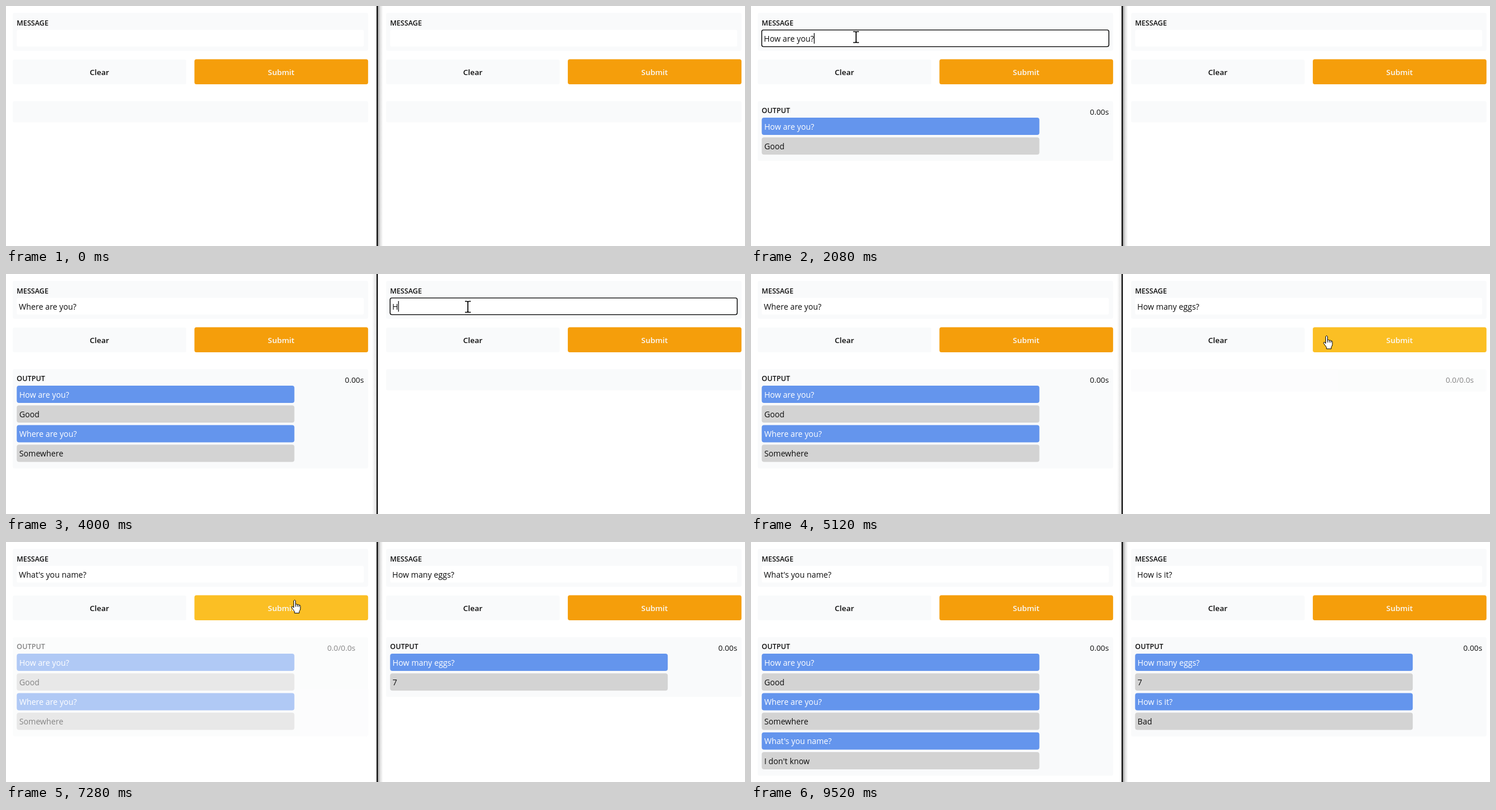
An HTML page for the animation above (9600 ms loop, 1280x417 px).

```html
<!DOCTYPE html>
<html lang="en">
<head>
<meta charset="utf-8">
<title>Two chat sessions</title>
<style>
  html, body { margin: 0; width: 100%; height: 100%; overflow: hidden; background: #fff; }
  svg { display: block; width: 100%; height: 100%; }
  text { font: 13.8px "Open Sans", "Noto Sans", sans-serif; fill: #0c0c0c; white-space: pre; }
  .label { font-size: 12.2px; font-weight: 600; }
  .button { font-size: 13.4px; font-weight: 600; text-anchor: middle; }
  .time { font-size: 13.3px; text-anchor: end; }
</style>
</head>
<body>
<svg id="stage" viewBox="0 0 1280 417">
  <defs>
    <linearGradient id="shadowRight">
      <stop offset="0" stop-color="#000" stop-opacity=".42"/>
      <stop offset=".4" stop-color="#000" stop-opacity=".14"/>
      <stop offset="1" stop-color="#000" stop-opacity="0"/>
    </linearGradient>
    <linearGradient id="shadowLeft">
      <stop offset="0" stop-color="#000" stop-opacity="0"/>
      <stop offset="1" stop-color="#000" stop-opacity=".13"/>
    </linearGradient>
  </defs>
</svg>
<script>
const LOOP = 9600, STEP = 80, FADE = 150;
const PANEL = '#f9fafb', AMBER = [245, 158, 11], AMBER_HOVER = [251, 191, 36];
const RIGHT = 646.7;
const stage = document.getElementById('stage');

function add(parent, tag, attrs = {}, text = '') {
  const node = document.createElementNS('http://www.w3.org/2000/svg', tag);
  set(node, attrs);
  node.textContent = text;
  return parent.appendChild(node);
}
function set(node, attrs) {
  for (const key in attrs) node.setAttribute(key, attrs[key]);
}
const box = (parent, x, y, width, height, rx, fill) =>
  add(parent, 'rect', { x, y, width, height, rx, fill });
const show = (node, on) => set(node, { visibility: on ? 'visible' : 'hidden' });
const within = (spans, t) => spans.some(([from, to]) => t >= from && t < to);
const latest = (keys, t) => keys.reduce((value, [at, next]) => t >= at ? next : value, '');

const sessions = [
  {
    x: 0,
    typed: [
      [640, 'H'], [800, 'Ho'], [880, 'How '], [960, 'How ar'], [1040, 'How are y'],
      [1120, 'How are you'], [1280, 'How are you?'],
      [2480, 'W'], [2560, 'Whe'], [2640, 'Where'], [2720, 'Where a'], [2800, 'Where are '],
      [2880, 'Where are yo'], [2960, 'Where are you?'],
      [6080, 'W'], [6160, 'Wha'], [6240, "What'"], [6320, "What's "], [6400, "What's yo"],
      [6480, "What's you "], [6560, "What's you na"], [6640, "What's you name"],
      [6800, "What's you name?"]
    ],
    focus: [[320, 1680], [2080, 3200], [5440, 7120]],
    selected: [[2320, 2480], [5920, 6080]],
    caretOff: [[560, 640], [5600, 5760]],
    loading: [[1680, 1840], [3280, 3440], [7200, 7360]],
    replies: [
      [1840, 'How are you?', 'Good'],
      [3440, 'Where are you?', 'Somewhere'],
      [7360, "What's you name?", "I don't know"]
    ]
  },
  {
    x: RIGHT,
    typed: [
      [4000, 'H'], [4160, 'Ho'], [4240, 'How '], [4320, 'How m'], [4400, 'How man'],
      [4480, 'How many '], [4560, 'How many eg'], [4640, 'How many eggs'], [4800, 'How many eggs?'],
      [8080, 'H'], [8240, 'How '], [8400, 'How i'], [8480, 'How is '], [8560, 'How is i'],
      [8640, 'How is it?']
    ],
    focus: [[3680, 5040], [7600, 8960]],
    selected: [[7760, 8080]],
    caretOff: [],
    loading: [[5120, 5200], [9040, 9120]],
    replies: [[5200, 'How many eggs?', '7'], [9120, 'How is it?', 'Bad']]
  }
];

// Pointer path: time, x, y.
const path = [
  [80, 230, 71], [240, 182, 54], [1360, 182, 54], [1600, 380, 112], [1700, 380, 112],
  [2000, 182, 54], [3040, 182, 54], [3170, 480, 115], [3220, 500, 112], [3360, 620, 75],
  [3600, 800, 57], [4880, 800, 57], [4960, 990, 110], [5120, 997, 107], [5160, 997, 107],
  [5440, 210, 56], [6880, 210, 56], [7100, 430, 110], [7210, 440, 110], [7600, 774, 57],
  [8720, 774, 57], [8930, 1000, 110], [9100, 1010, 110], [9340, 1130, 230]
];

function pointerAt(t) {
  const i = path.findIndex(([at]) => at > t);
  if (i < 1) return null;
  const [t0, x0, y0] = path[i - 1], [t1, x1, y1] = path[i];
  const k = (t - t0) / (t1 - t0);
  return { x: x0 + (x1 - x0) * k, y: y0 + (y1 - y0) * k };
}
const over = (p, left, top, right, bottom) =>
  p && p.x >= left && p.x < right && p.y >= top && p.y < bottom;
const overSubmit = (p, x) => over(p, x + 326.5, 92.5, x + 627, 136);
const overClear = (p, x) => over(p, x + 12, 93, x + 312, 136);
const overInput = (p, x) => over(p, x + 18, 41, x + 620, 71);

// Share of the colour fade reached, from where the pointer has just been.
function hoverAmount(t, x) {
  let sum = 0;
  for (let i = 0; i < 30; i++) sum += overSubmit(pointerAt(t - FADE * i / 30), x) ? 1 : 0;
  return sum / 30;
}

function buildSession(s) {
  const g = add(stage, 'g', { transform: `translate(${s.x} 0)` });
  box(g, 11.7, 12, 615.5, 65.7, 3, PANEL);
  add(g, 'text', { class: 'label', x: 18.6, y: 33.5 }, 'MESSAGE');
  s.field = box(g, 18.6, 41.6, 601.2, 29, 3, '#fff');
  s.highlight = box(g, 22.5, 46, 0, 20.5, 0, '#0078d7');
  s.text = add(g, 'text', { x: 22.3, y: 61.8 });
  s.caret = box(g, 0, 47, 1.2, 18.5, 0, '#000');
  box(g, 11.7, 93, 300.5, 43, 3, PANEL);
  add(g, 'text', { class: 'button', x: 161.8, y: 119.8 }, 'Clear');
  s.submit = box(g, 326.4, 92.5, 300.8, 43.5, 3.5);
  add(g, 'text', { class: 'button', x: 476.6, y: 119.8, style: 'fill:#f9fafb' }, 'Submit');

  s.output = add(g, 'g');
  s.panel = box(s.output, 11.7, 165.3, 615.5, 37, 3, PANEL);
  s.title = add(s.output, 'text', { class: 'label', x: 18.6, y: 186 }, 'OUTPUT');
  s.time = add(s.output, 'text', { class: 'time', y: 188.8 });
  s.pairs = s.replies.map(([, question, answer], i) => {
    const pair = add(s.output, 'g', { transform: `translate(0 ${i * 68.4})` });
    [[question, '#6495ed', '#fff'], [answer, '#d3d3d3', '#0c0c0c']].forEach(([words, fill, ink], j) => {
      const y = 194 + j * 34.2;
      box(pair, 18.6, y, 480.9, 30, 4, fill);
      add(pair, 'text', { x: 22.9, y: y + 20.6, style: `fill:${ink}` }, words);
    });
    return pair;
  });
}

function drawSession(s, t) {
  const focused = within(s.focus, t), selected = within(s.selected, t);
  set(s.field, { stroke: focused ? '#000' : 'none', 'stroke-width': 1.4 });
  s.text.textContent = latest(s.typed, t);
  s.text.style.fill = selected ? '#fff' : '';
  const width = s.text.getComputedTextLength();
  set(s.highlight, { width: selected ? width : 0 });
  set(s.caret, { x: 22.3 + width });
  show(s.caret, focused && !selected && !within(s.caretOff, t));

  const k = hoverAmount(t, s.x);
  const rgb = AMBER.map((c, i) => Math.round(c + (AMBER_HOVER[i] - c) * k));
  set(s.submit, { fill: `rgb(${rgb})` });

  const loading = within(s.loading, t);
  const count = s.replies.filter(([at]) => t >= at).length;
  s.pairs.forEach((pair, i) => show(pair, i < count));
  show(s.title, count > 0);
  show(s.time, loading || count > 0);
  s.time.textContent = loading ? '0.0/0.0s' : '0.00s';
  set(s.time, { x: loading ? 605.2 : 619.8 });
  set(s.panel, { height: count ? 35.6 + 68.4 * count : loading ? 39 : 37 });
  set(s.output, { opacity: loading ? 0.5 : 1 });
}

sessions.forEach(buildSession);
const shadows = [
  box(stage, 644, 0, 9, 417, 0, 'url(#shadowRight)'),
  box(stage, 634, 0, 8, 417, 0, 'url(#shadowLeft)')
];
box(stage, 641.8, 0, 2.2, 417, 0, '#0a0a0a');

const shape = (d, fill, width) => add(stage, 'path', {
  d, fill, stroke: '#000', 'stroke-width': width, 'stroke-linejoin': 'round'
});
const pointers = {
  beam: shape('M-5-9.5H-2Q0-9.5 0-8Q0-9.5 2-9.5H5M0-8V8M-5 9.5H-2Q0 9.5 0 8Q0 9.5 2 9.5H5', 'none', 1.7),
  arrow: shape('M0 0V17L4 13.2L6.6 19.3L9.3 18.1L6.7 12.2H12.2Z', '#fff', 1),
  hand: shape('M-1.6 1.5Q0-1 1.6 1.5V8Q3.2 6.4 4.6 8.4Q6.2 7.2 7.4 9.2Q9.8 8.4 10 11V15.5' +
    'Q9.6 18.5 8 20V23H-.2V20.4L-5.2 13.4Q-5.4 10.8-3.2 11.6L-1.6 13.6ZM1.6 8V12M4.6 8.4V12M7.4 9.2V12.4', '#fff', 1)
};

function drawPointer(p) {
  const on = test => sessions.some(s => test(p, s.x));
  const kind = !p ? '' : on(overInput) ? 'beam' : on(overSubmit) || on(overClear) ? 'hand' : 'arrow';
  for (const name in pointers) show(pointers[name], name === kind);
  if (p) set(pointers[kind], { transform: `translate(${p.x} ${p.y})` });
}

function render(t) {
  sessions.forEach(s => drawSession(s, t));
  const rightActive = within([[3680, 5440], [7600, 9520]], t);
  show(shadows[0], !rightActive);
  show(shadows[1], rightActive);
  drawPointer(pointerAt(t));
}

const start = performance.now();
function tick() {
  const t = (performance.now() - start) % LOOP;
  render(Math.floor(t / STEP) * STEP);
  requestAnimationFrame(tick);
}
tick();
</script>
</body>
</html>
```
